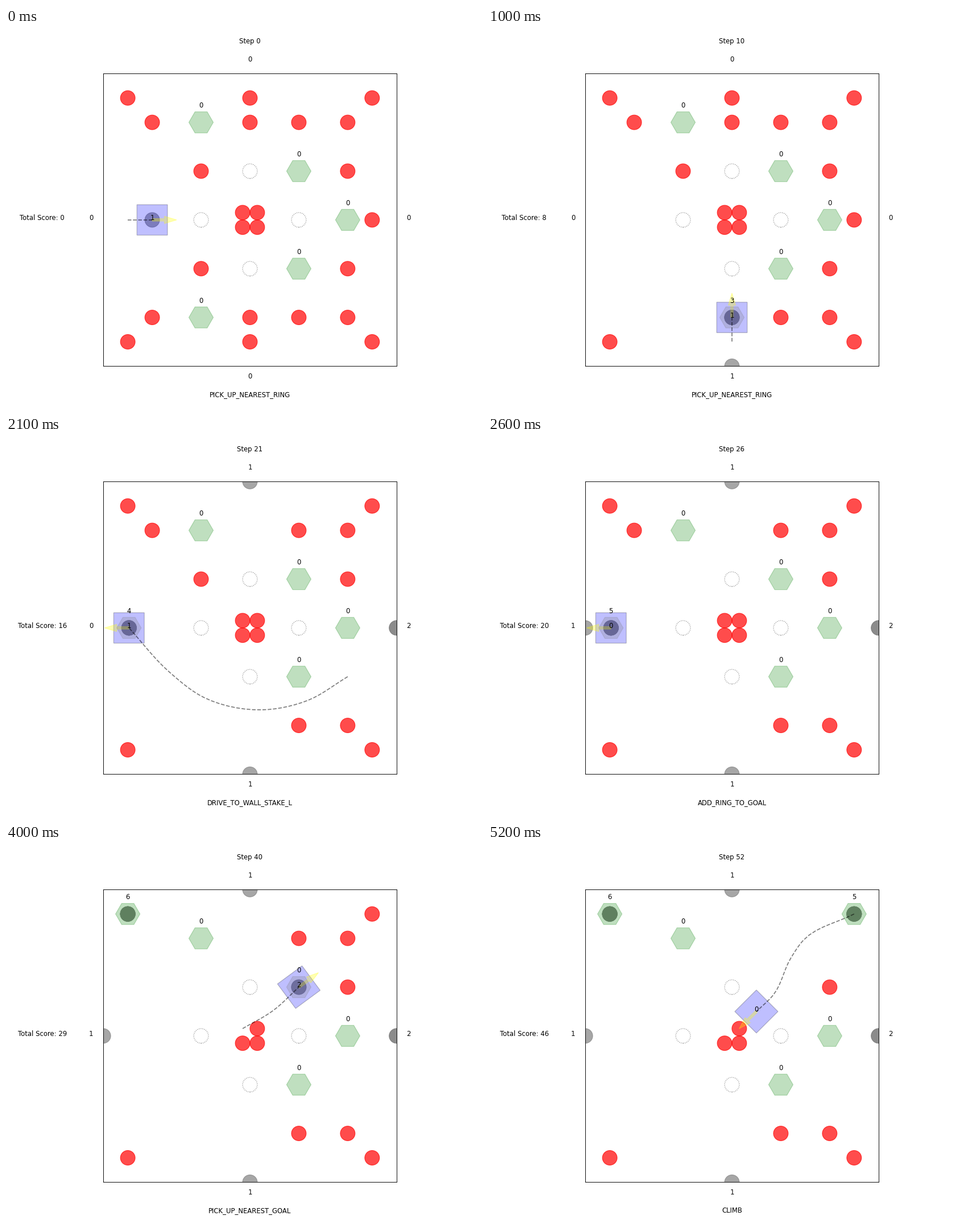
Recreate the animation shown at these times as a matplotlib script. Size 837 px wide and 669 px high, loop 5.3 s.

```python
import math
from itertools import product

import matplotlib.pyplot as plt
import numpy as np
from matplotlib.animation import FuncAnimation
from matplotlib.patches import Circle, FancyArrow, Rectangle, RegularPolygon

# Stage and field; the field is a square around the point (MID, MID)
DPI = 83.7
SIZE = [(px + 1e-6) / DPI for px in (837, 669)]
MID = 6
RING_R, GOAL_R, ROBOT = 0.3, 0.5, 1.25
WALL_GAP = 1.05
HEADINGS = {"R": 0, "T": 90, "L": 180, "B": -90}


def mirror(points):
    """Add the reflection of every point across the middle row."""
    return sorted({q for x, y in points for q in [(x, y), (x, 2 * MID - y)]})


def from_mid(angle, r):
    a = math.radians(angle)
    return MID + r * math.cos(a), MID + r * math.sin(a)


CORNERS = list(product((1, 11), repeat=2))
CENTER = list(product((MID - RING_R, MID + RING_R), repeat=2))
RINGS = sorted(CORNERS + CENTER + mirror(
    [(x, 2) for x in (2, 6, 8, 10)]
    + [(6, 1), (4, 4), (10, 4), (2, MID), (11, MID)]))
GOALS = mirror([(4, 2), (8, 4), (10, MID)])
POLES = [from_mid(a, 2) for a in HEADINGS.values()]

NAMES = {"r": "PICK_UP_NEAREST_RING", "g": "PICK_UP_NEAREST_GOAL",
         "a": "ADD_RING_TO_GOAL", "w": "ADD_RING_TO_WALL_STAKE",
         "c": "DRIVE_TO_CORNER_TL", "d": "DROP_GOAL", "x": "CLIMB"}
NAMES.update({k: "DRIVE_TO_WALL_STAKE_" + k for k in HEADINGS})

PLAN = "r" "rgaara" "BrwrTw" "rrRwwr" "arLwra" "LagLrg" \
       "ragcda" "aargaa" "raraga" "radx"

# Key points of the routes that bend around the poles, by step
DETOURS = {
    11: [(8.1, 3.1), (9.36, 6), (8.2, 8.85)],
    21: [(8.35, 3.02), (6.49, 2.64), (4.11, 3.15), (2.69, 4.2)],
    40: [(6.95, 7.04)],
    52: [(8.91, 9.91), (8.42, 9.21), (7.7, 7.69)],
}


def smooth(points, n=8):
    """Hermite curve through the points, spaced by chord length."""
    p = np.array(points, float)
    if len(p) < 3:
        return p
    t = np.r_[0, np.cumsum(np.hypot(*np.diff(p, axis=0).T))]
    slope = np.gradient(p, t, axis=0)
    u = np.linspace(0, 1, n)[:, None]
    parts = []
    for i, h in enumerate(np.diff(t)):
        parts.append((1 + 2 * u) * (1 - u) ** 2 * p[i]
                     + u * (1 - u) ** 2 * h * slope[i]
                     + u ** 2 * (3 - 2 * u) * p[i + 1]
                     - u ** 2 * (1 - u) * h * slope[i + 1])
    return np.concatenate(parts)


def stack_score(n):
    return n + 2 if n else 0


def simulate():
    """Play the plan and return one state per step."""
    pos, angle = (1, MID), 0
    rings, goals = list(RINGS), [(p, 0) for p in GOALS]
    walls = dict.fromkeys(HEADINGS, 0)
    held, load, stake = None, 0, None
    states = []

    for step, act in enumerate(PLAN):
        start = pos

        def gap(p):
            return math.dist(p, start)

        if act == "r":
            pos = min(rings, key=gap)
            rings.remove(pos)
            load += 1
        elif act == "g" and held is None:
            target = min(goals, key=lambda g: gap(g[0]))
            goals.remove(target)
            pos, held = target
        elif act == "a" and held is not None and load:
            held += 1
            load -= 1
        elif act == "w":
            walls[stake] += 1
            load -= 1
        elif act in HEADINGS:
            stake = act
            pos = from_mid(HEADINGS[act], MID - WALL_GAP)
        elif act == "c":
            pos = (1, 11)
        elif act == "d":
            goals.append((pos, held))
            held = None
        elif act == "x":
            pos = (7, 7)

        path = None
        if pos != start:
            path = smooth([start, *DETOURS.get(step, []), pos])
            angle = math.degrees(math.atan2(pos[1] - start[1],
                                            pos[0] - start[0]))
        angle = HEADINGS.get(act, angle)

        score = sum(map(stack_score, walls.values()))
        score += sum(stack_score(n) * (2 if p in CORNERS else 1)
                     for p, n in goals)
        score += stack_score(held) + (3 if act == "x" else 0)
        states.append(dict(
            act=act, pos=pos, angle=angle, path=path, load=load, held=held,
            score=score, rings=list(rings), goals=list(goals),
            walls=dict(walls)))
    return states


STATES = simulate()

fig = plt.figure(figsize=SIZE, dpi=DPI, facecolor="white")
ax = fig.add_axes([0.2045, 0.11, 0.616, 0.77])
ax.set(xlim=(0, 2 * MID), ylim=(0, 2 * MID), xticks=[], yticks=[])


def label(p, text, lift=0):
    ax.text(p[0], p[1] + lift, str(text), ha="center", fontsize=10,
            family="DejaVu Sans")


def ring(p, color, count=1):
    for _ in range(count):
        ax.add_patch(Circle(p, RING_R, color=color, alpha=0.7))


def goal(p, color, count):
    ax.add_patch(RegularPolygon(p, 6, radius=GOAL_R, orientation=math.pi / 6,
                                color=color, alpha=0.25))
    label(p, count, 0.6)


def robot(p, angle, load):
    half = ROBOT / 2
    ax.add_patch(Rectangle((p[0] - half, p[1] - half), ROBOT, ROBOT,
                           angle=angle, rotation_point="center", snap=False,
                           facecolor="blue", edgecolor="black", alpha=0.25))
    a = math.radians(angle)
    ax.add_patch(FancyArrow(*p, 0.5 * math.cos(a), 0.5 * math.sin(a),
                            width=0.1, head_width=0.3, head_length=0.5,
                            color="yellow", alpha=0.3))
    label(p, load)


def draw(step):
    for artist in [*ax.patches, *ax.lines, *ax.texts]:
        artist.remove()
    s = STATES[step]

    # Scored and carried rings lie below the free ones
    for key, heading in HEADINGS.items():
        ring(from_mid(heading, MID), "gray", s["walls"][key])
        label(from_mid(heading, MID + 0.5), s["walls"][key])
    for p, n in s["goals"]:
        ring(p, "gray", n)
    ring(s["pos"], "gray", s["load"] + (s["held"] or 0))
    for p in s["rings"]:
        ring(p, "red")

    robot(s["pos"], s["angle"], s["load"])
    for p, n in s["goals"]:
        goal(p, "green", n)
    if s["held"] is not None:
        goal(s["pos"], "gray", s["held"])
    for p in POLES:
        ax.add_patch(Circle(p, RING_R, fill=False, edgecolor="black",
                            linestyle="dotted", alpha=0.5))
    if s["path"] is not None:
        ax.plot(*s["path"].T, "k--", lw=1.5, alpha=0.5,
                scalex=False, scaley=False)

    label((MID, 13.25), f"Step {step}")
    label((-2.5, MID), f"Total Score: {s['score']}")
    label((MID, -1.25), NAMES[s["act"]])
    return []


anim = FuncAnimation(fig, draw, frames=len(PLAN), init_func=lambda: [],
                     interval=100, repeat=True, repeat_delay=0)
plt.show()
```
